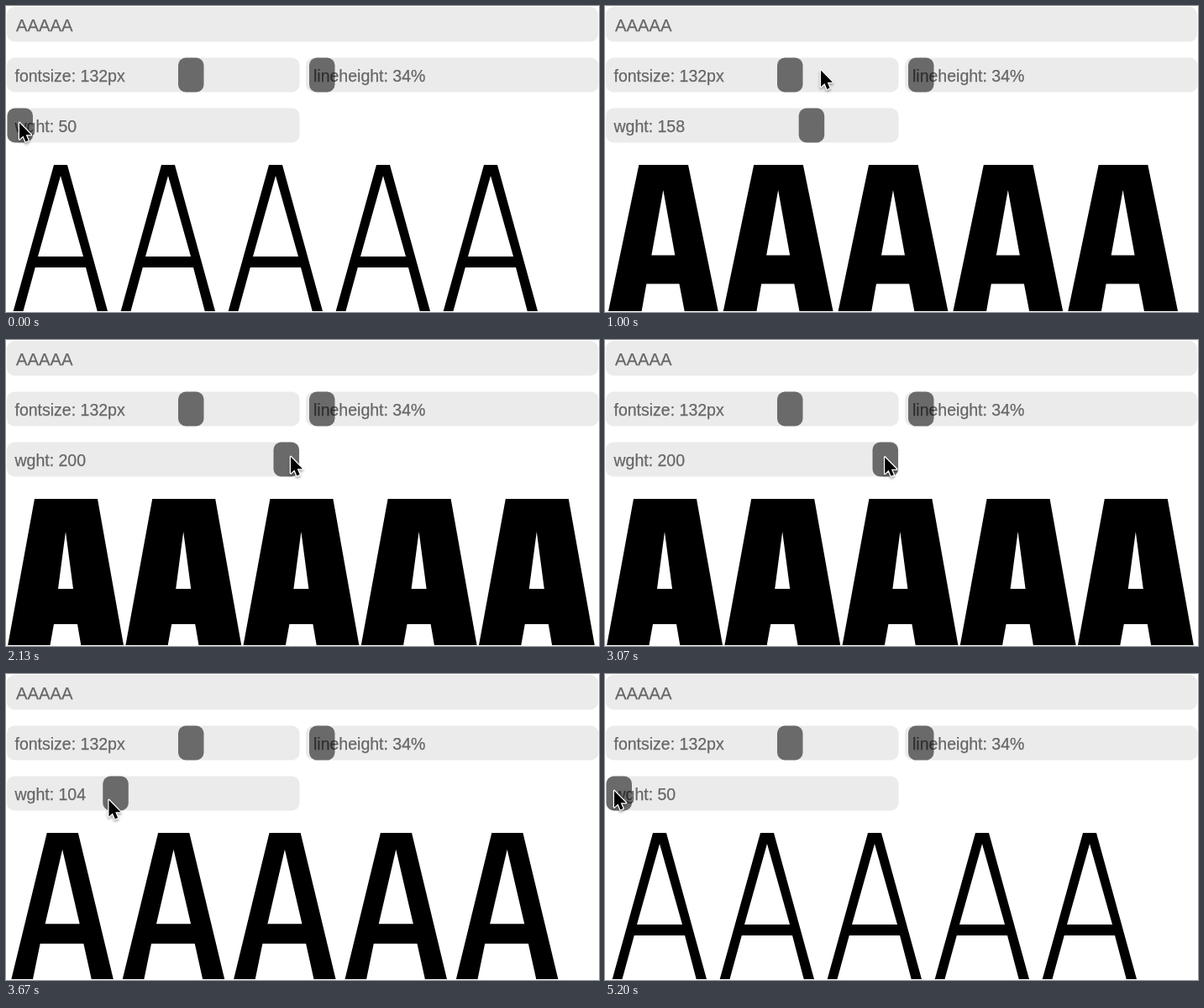
These frames come from a looping animation (706x364 px, 5270 ms). An HTML page:

```html
<!DOCTYPE html>
<html lang="en">
<head>
<meta charset="utf-8">
<title>Variable weight slider</title>
<style>
  html, body { margin: 0; width: 100%; height: 100%; overflow: hidden; background: #fff; }
  svg { display: block; width: 706px; height: 364px; }
  text {
    font: 19.5px "Liberation Sans", Arial, sans-serif;
    fill: #666; stroke: #666; stroke-width: .25; white-space: pre;
  }
  .bar { fill: #ebebeb; }
  .knob { fill: #000; fill-opacity: .55; }
  #cursor path { stroke: #fff; stroke-width: 2.6; stroke-linejoin: round; paint-order: stroke; }
  #cursor { filter: drop-shadow(0 2px 1.5px rgba(0, 0, 0, .35)); }
</style>
</head>
<body>
<svg viewBox="0 0 706 364">
  <g class="bar">
    <rect x="1" y="1" width="704" height="41.5" rx="9"/>
    <rect x="1" y="61.5" width="348.5" height="41" rx="9"/>
    <rect x="357" y="61.5" width="348.5" height="41" rx="9"/>
    <rect x="1" y="121.5" width="348.5" height="41" rx="9"/>
  </g>
  <text x="12" y="29.5" style="font-size:20.3px">AAAAA</text>
  <text x="10.5" y="89.5">fontsize: 132px</text>
  <text x="366" y="89.5">lineheight: 34%</text>
  <text x="10.5" y="149.5" id="label"></text>
  <g class="knob">
    <rect x="205" y="61.5" width="30.5" height="41" rx="9"/>
    <rect x="361" y="61.5" width="30.5" height="41" rx="9"/>
    <rect id="knob" y="121.5" width="30.5" height="41" rx="9"/>
  </g>
  <path id="word" fill-rule="evenodd"/>
  <g id="cursor"><path d="M0 0V19.5L4.5 15.4L7.4 22.4L10.6 21L7.7 14.3H14Z"/></g>
</svg>
<script>
const LOOP = 5270, FPS = 15;
const LAG = .45;               // steps the knob trails the pointer
const GRAB = 16, TRAVEL = 317; // pointer x at the lightest weight, slider length
const $ = id => document.getElementById(id);
const label = $('label'), knob = $('knob'), word = $('word'), cursor = $('cursor');

// Turning points of the hand: step, x, y
const path = [
  [3, 16, 139], [10, 86, 125], [15, 257, 76.5], [18, 308, 89], [27, 339, 139],
  [45, 339, 139], [50, 251, 145], [55, 122.5, 150], [61, 66, 145], [64, 25, 140], [72, 11, 139]
];

const mix = (a, b, k) => a + (b - a) * k;
const clamp = (v, lo, hi) => Math.min(hi, Math.max(lo, v));

const slope = (i, n) => (path[i + 1][n] - path[i][n]) / (path[i + 1][0] - path[i][0]);

// Harmonic mean of the neighbouring slopes keeps the curve from overshooting.
function tangent(i, n) {
  if (i === 0 || i === path.length - 1) return 0;
  const a = slope(i - 1, n), b = slope(i, n);
  return a * b > 0 ? 2 * a * b / (a + b) : 0;
}

function pointer(step, n) {
  const s = clamp(step, path[0][0], path[path.length - 1][0]);
  const i = Math.max(1, path.findIndex(p => p[0] >= s)) - 1;
  const a = path[i], b = path[i + 1], h = b[0] - a[0], u = (s - a[0]) / h;
  const ease = u * u * (3 - 2 * u);
  return mix(a[n], b[n], ease) +
    h * u * (1 - u) * ((1 - u) * tangent(i, n) - u * tangent(i + 1, n));
}

// One letter, blended between the thin and the heavy drawing.
function letterA(k, x) {
  const late = k ** 1.3;
  const px = (a, b, t = k) => (x + mix(a, b, t)).toFixed(2);
  const barTop = mix(298, 296, k), barBottom = mix(311, 338, k);
  return `M${px(57, 34)} 189H${px(73, 109)}L${px(121, 140)} 363H${px(108.7, 89.3)}` +
    `L${px(95, 85, late)} ${barBottom}H${px(34.8, 57, late)}L${px(20.5, 52.5)} 363H${px(8.7, 2.2)}Z` +
    `M${px(65, 71)} ${mix(202, 228, late)}L${px(92, 80)} ${barTop}H${px(38, 62)}Z`;
}

function draw(time) {
  const step = Math.floor((time + 3.4) * FPS / 1000);
  const k = clamp((pointer(step - LAG, 1) - GRAB) / TRAVEL, 0, 1);
  const pitch = mix(128, 140.2, k);
  label.textContent = 'wght: ' + Math.round(mix(50, 200, k));
  knob.setAttribute('x', 1.5 + TRAVEL * k);
  word.setAttribute('d', [0, 1, 2, 3, 4].map(i => letterA(k, i * pitch)).join(''));
  cursor.setAttribute('transform', `translate(${pointer(step, 1)} ${pointer(step, 2)})`);
}

const start = performance.now();
function tick() {
  draw((performance.now() - start) % LOOP);
  requestAnimationFrame(tick);
}
tick();
</script>
</body>
</html>
```
